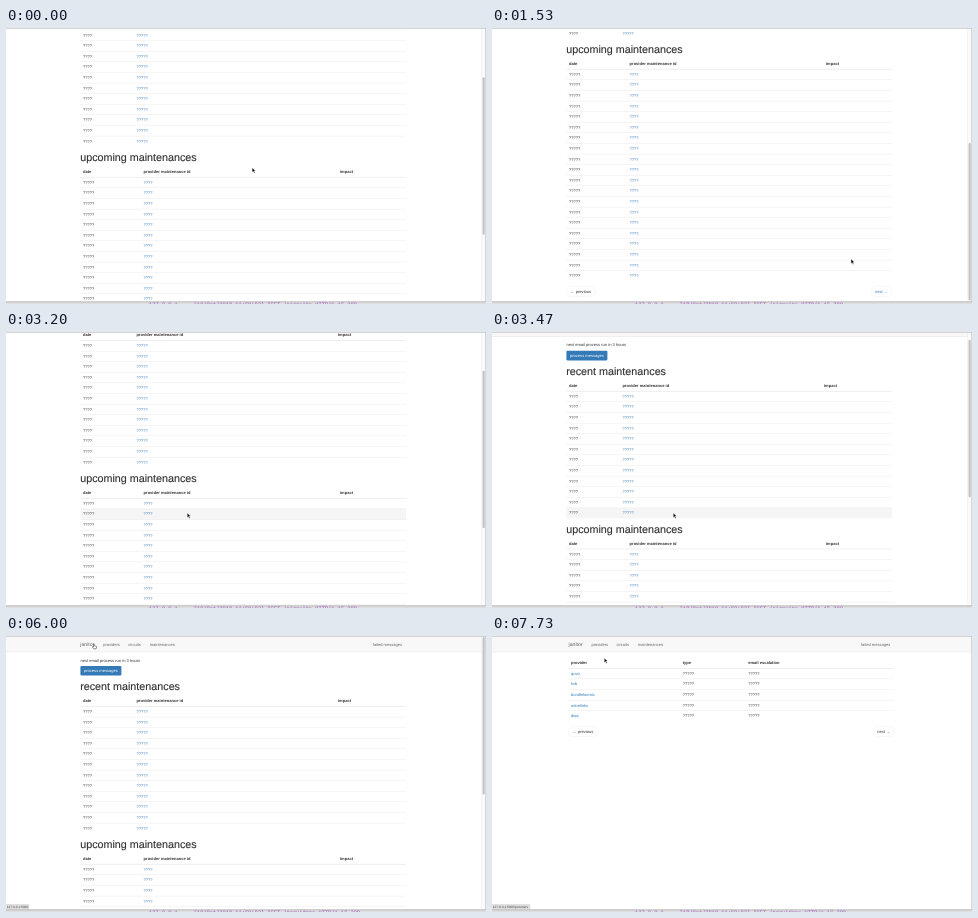
An HTML page for the animation above (8 s loop, 480 by 276 pixels).

```html
<!DOCTYPE html>
<html lang="en">
<head>
<meta charset="utf-8">
<title>janitor</title>
<style>
  html, body { margin: 0; width: 100%; height: 100%; overflow: hidden; background: #fff; }
  svg { display: block; width: 100vw; height: 100vh; }
  text { font: 4.05px "Liberation Sans", Arial, sans-serif; fill: #333; text-rendering: geometricPrecision; white-space: pre; }
  .th { font-weight: bold; }
  .link { fill: #337ab7; }
  .nav { fill: #666; }
  .brand { font-size: 5.2px; fill: #666; }
  .h1 { font-size: 10.75px; stroke: #333; stroke-width: .14; }
  .button { fill: #fff; }
  .status { font-size: 3.2px; fill: #444; }
  .log { font: 5.33px "Liberation Mono", "DejaVu Sans Mono", monospace; fill: #a04fc0; }
</style>
</head>
<body>
<svg id="stage" viewBox="0 0 480 276"></svg>
<script>
const ROW = 10.6, BOTTOM = 273.5;
const stage = document.getElementById('stage');

function add(parent, tag, attrs, content) {
  const el = document.createElementNS('http://www.w3.org/2000/svg', tag);
  for (const key in attrs) el.setAttribute(key, attrs[key]);
  if (content !== undefined) el.textContent = content;
  parent.append(el);
  return el;
}
const rect = (parent, x, y, width, height, fill, more) =>
  add(parent, 'rect', { x, y, width, height, fill, ...more });
// y is the vertical middle of the line of text
const label = (parent, x, y, content, cls = '') =>
  add(parent, 'text', { x, y: y + (cls === 'h1' ? 2.9 : cls === 'brand' ? 1.7 : 1.35), class: cls }, content);

function navbar(page, dx) {
  rect(page, 0, 0, 480, 16, '#f8f8f8');
  rect(page, 0, 15.8, 480, .35, '#dcdcdc');
  label(page, 74.3 + dx, 8, 'janitor', 'brand');
  [[97.2, 'providers'], [122.3, 'circuits'], [143.7, 'maintenances'], [366.8, 'failed messages']]
    .forEach(([x, name]) => label(page, x + dx, 8.3, name, 'nav'));
}

// columns: [x, heading, cell text or function, class]
function table(page, left, y, count, columns) {
  columns.forEach(([x, heading]) => label(page, x, y, heading, 'th'));
  const first = y + 10.8;
  rect(page, left, first - 5.5, 325.6, .5, '#ddd');
  for (let i = 0; i < count; i++) {
    const middle = first + i * ROW;
    if (i) rect(page, left, middle - 5.3, 325.6, .3, '#ddd');
    columns.forEach(([x, , cell, cls]) => {
      if (cell) label(page, x, middle, typeof cell === 'function' ? cell(i) : cell, cls);
    });
  }
}

function pager(page, dx, y, nextClass) {
  [[74.5, 28.6], [379, 21]].forEach(([x, w]) =>
    rect(page, x + dx, y - 5, w, 10, 'none', { rx: 4.3, stroke: '#e4e4e4', 'stroke-width': .3 }));
  label(page, 78.6 + dx, y, '← previous');
  label(page, 383 + dx, y, 'next →', nextClass);
}

// Home page
const home = add(stage, 'g', {});
const hover = rect(home, 74.4, 0, 325.6, ROW, '#f5f5f5');
navbar(home, 0);
label(home, 74.4, 24.2, 'next email process run in 3 hours');
const button = rect(home, 74.4, 29.9, 41, 9.7, '#337ab7', { rx: 1.1 });
label(home, 78, 34.7, 'process messages', 'button');
label(home, 74.2, 51.2, 'recent maintenances', 'h1');
table(home, 74.4, 64.8, 12, [[77, 'date', '????'], [130.4, 'provider maintenance id', '?????', 'link'], [332, 'impact']]);
label(home, 74.2, 209, 'upcoming maintenances', 'h1');
table(home, 74.4, 222.6, 20, [[77, 'date', '?????'], [137.6, 'provider maintenance id', '????', 'link'], [334, 'impact']]);
pager(home, 0, 450.5, 'link');

// Providers page
const providers = add(stage, 'g', {});
const names = ['quvo', 'kvb', 'bundleloomic', 'ostrelinks', 'dwq'];
navbar(providers, 2.2);
table(providers, 76.6, 26.7, 5, [[79, 'provider', i => names[i], 'link'], [190.7, 'type', '?????'], [256.2, 'email escalation', '?????']]);
pager(providers, 2.2, 95.5, '');

// Window furniture
const scrollbar = add(stage, 'g', {});
rect(scrollbar, 475.6, 0, 4, BOTTOM, '#fafafa');
rect(scrollbar, 475.6, 0, .4, BOTTOM, '#e6e6e6');
const thumb = rect(scrollbar, 476.6, 0, 2.1, 157.5, '#c1c1c1', { rx: 1 });
const status = add(stage, 'g', {});
const statusBox = rect(status, -1, 268.4, 38, 5.4, '#dfdfdf', { rx: .8, stroke: '#bbb', 'stroke-width': .3 });
const statusText = label(status, .8, 270.9, '', 'status');
rect(stage, 0, 0, 480, .9, '#d0d0d0');
rect(stage, 479.4, 0, .6, 276, '#bdbdbd');
rect(stage, 0, BOTTOM, 480, 2.5, '#dedede');
rect(stage, 0, BOTTOM, 480, .8, '#b4b4b4');
const log = add(stage, 'text', { x: 143, y: 277.6, class: 'log' }, '');

const pointer = add(stage, 'g', {});
const arrow = add(pointer, 'path', { d: 'M0 0V4.6L1.1 3.6L1.9 5.4L2.7 5L1.9 3.3H3.3Z', fill: '#000', stroke: '#fff', 'stroke-width': .35 });
const hand = add(pointer, 'path', { d: 'M-.4 .3Q0 -.3 .4 .3V1.8L2.4 2.2Q2.9 2.4 2.8 3.2L2.3 4.8H0L-1.5 2.9Q-1.2 2.3 -.4 3Z', fill: '#fff', stroke: '#222', 'stroke-width': .5 });

// Pointer stops: time, x, y
const stops = [
  [0, 246.2, 139.7], [900, 246.2, 139.7], [1150, 256, 121], [1700, 389, 263],
  [1930, 389, 263], [2330, 298.3, 208], [2600, 238, 202], [2730, 181.3, 181],
  [3700, 181.3, 181], [3930, 110, 75], [4040, 110, 75], [4150, 100, 35],
  [4470, 285, 196.5], [4630, 285, 196.5], [4670, 279.3, 190], [5130, 87.8, 8],
  [6080, 87.8, 8], [6450, 108, 7.6], [7350, 108, 7.6], [7700, 112.3, 22], [8000, 112.3, 22]
];
const clamp = v => Math.min(1, Math.max(0, v));
const smooth = v => v * v * (3 - 2 * v);
const easeOut = v => 1 - (1 - v) ** 2;
const inside = ([x, y], [x0, y0, x1, y1]) => x >= x0 && x <= x1 && y >= y0 && y <= y1;

function pointerAt(t) {
  const i = stops.findIndex(stop => stop[0] > t);
  const [t0, x0, y0] = stops[i - 1], [t1, x1, y1] = stops[i];
  const p = smooth((t - t0) / (t1 - t0));
  return [x0 + (x1 - x0) * p, y0 + (y1 - y0) * p];
}

const scrollAt = t => t < 2800
  ? 79 + 108 * easeOut(clamp((t - 35) / 660))
  : 187 * (1 - easeOut(clamp((t - 2855) / 815)));

function statusAt(t) {
  if (t >= 1800 && t < 2560) return '/?page=2';
  if (t >= 5300 && t < 6520) return '';
  return t >= 6520 ? '/providers' : null;
}

function hoveredRow([x, y], scroll) {
  if (x < 74.4 || x > 400) return null;
  for (const [middle, count] of [[75.6, 12], [233.4, 20]]) {
    const i = Math.floor((y + scroll - middle + ROW / 2) / ROW);
    if (i >= 0 && i < count) return middle - ROW / 2 + i * ROW;
  }
  return null;
}

const show = (el, on) => el.setAttribute('visibility', on ? 'visible' : 'hidden');

function render(t) {
  const scroll = scrollAt(t), at = pointerAt(t), onHome = t < 7320;
  home.setAttribute('transform', `translate(0 ${-scroll})`);
  home.style.display = scrollbar.style.display = onHome ? '' : 'none';
  providers.style.display = onHome ? 'none' : '';
  thumb.setAttribute('y', 1 + scroll * .61);

  const row = t > 1800 ? hoveredRow(at, scroll) : null;
  show(hover, onHome && row !== null);
  if (row !== null) hover.setAttribute('y', row);

  const onButton = scroll < 1 && inside(at, [74, 30, 115, 40]);
  button.setAttribute('fill', onButton ? '#286090' : '#337ab7');
  const onLink = onButton || inside(at, [74, 0, 172, 14]) || (scroll > 180 && inside(at, [379, 258, 400, 269]));
  show(hand, onLink);
  show(arrow, !onLink);
  pointer.setAttribute('transform', `translate(${at})`);

  const path = statusAt(t);
  show(status, path !== null);
  statusText.textContent = '127.0.0.1:5000' + (path || '');
  statusBox.setAttribute('width', path ? 39 : 24);
  log.textContent = `127.0.0.1 - - [19/Oct/2018 11:50:02] "GET ${t < 5400 ? '/circuits' : '/providers'} HTTP/1.1" 200`;
}

const start = performance.now();
function tick() {
  render((performance.now() - start) % 8000);
  requestAnimationFrame(tick);
}
tick();
</script>
</body>
</html>
```
